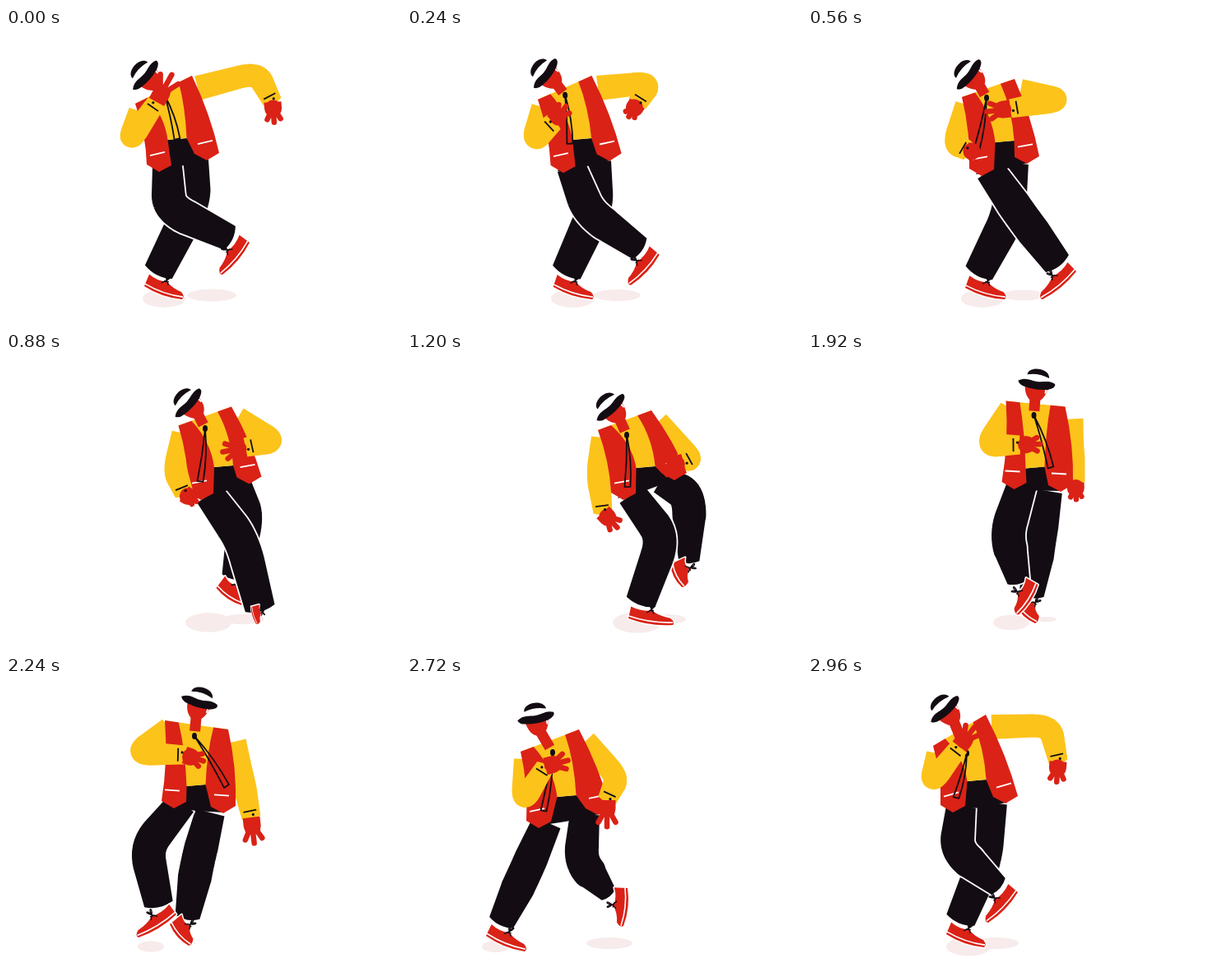
Write an HTML page with a canvas that moves like this. It is 480x360 px and loops after 3040 ms.

```html
<!DOCTYPE html>
<html lang="en">
<head>
<meta charset="utf-8">
<title>Dancing man</title>
<style>
html, body { margin: 0; width: 100%; height: 100%; overflow: hidden; background: #fff; }
canvas { display: block; }
</style>
</head>
<body>
<canvas id="stage" width="480" height="360"></canvas>
<script>
const ctx = document.getElementById('stage').getContext('2d');
const RED = '#da2217', YELLOW = '#fcc31b', BLACK = '#130d13', WHITE = '#fff', SHADE = '#f7ebeb';
const LOOP = 3040, STEP = 80, TAU = 2 * Math.PI;

// Joints of each key pose. hat: x, y, tilt in degrees; shade: centre and radius of two blobs;
// sway: how far the head drifts halfway to the next pose; front: the leg drawn on top.
const poses = [
  { t: 0, front: 'L', sway: [-14, -2], hat: [170, 58, -49], knot: [193, 82], tie: [208, 135],
    waist: [208, 135], shade: [192, 26, 250, 30],
    L: { shoulder: [157, 92], elbow: [150, 138], wrist: [183, 90], tip: [203, 54],
         hem: [186, 175], knee: [198, 220], heel: [296, 261], toe: [263, 300] },
    R: { shoulder: [226, 58], elbow: [305, 54], wrist: [324, 90], tip: [326, 117],
         hem: [244, 161], knee: [228, 212], heel: [168, 314], toe: [214, 330] } },
  { t: 560, front: 'L', sway: [0, 0], hat: [196, 57, -51], knot: [217, 85], tie: [204, 151],
    waist: [239, 138], shade: [212, 26, 262, 26],
    L: { shoulder: [187, 84], elbow: [178, 140], wrist: [195, 150], tip: [208, 150],
         hem: [211, 180], knee: [262, 232], heel: [326, 296], toe: [285, 330] },
    R: { shoulder: [251, 62], elbow: [309, 87], wrist: [246, 98], tip: [215, 102],
         hem: [266, 165], knee: [243, 230], heel: [191, 316], toe: [239, 330] } },
  { t: 1200, front: 'L', sway: [20, -20], hat: [248, 68, -43], knot: [267, 101], tie: [268, 164],
    waist: [290, 140], shade: [280, 30, 315, 24],
    L: { shoulder: [232, 95], elbow: [232, 148], wrist: [238, 195], tip: [257, 215],
         hem: [263, 180], knee: [312, 226], heel: [269, 324], toe: [323, 332] },
    R: { shoulder: [297, 71], elbow: [345, 129], wrist: [336, 134], tip: [307, 142],
         hem: [325, 156], knee: [343, 175], heel: [320, 258], toe: [334, 286] } },
  { t: 1600, front: 'R', sway: [0, 0], hat: [321, 46, 0], knot: [320, 81], tie: [322, 147],
    waist: [321, 148], shade: [318, 28, 350, 22],
    L: { shoulder: [288, 65], elbow: [276, 133], wrist: [298, 130], tip: [327, 120],
         hem: [297, 173], knee: [312, 235], heel: [352, 276], toe: [351, 321] },
    R: { shoulder: [355, 68], elbow: [355, 112], wrist: [352, 146], tip: [350, 156],
         hem: [350, 173], knee: [329, 232], heel: [304, 312], toe: [330, 332] } },
  { t: 2240, front: 'L', sway: [0, 0], hat: [235, 32, 16], knot: [229, 73], tie: [268, 134],
    waist: [231, 133], shade: [176, 16, 229, 3],
    L: { shoulder: [193, 54], elbow: [158, 94], wrist: [217, 96], tip: [242, 104],
         hem: [204, 161], knee: [170, 208], heel: [207, 290], toe: [161, 318] },
    R: { shoulder: [270, 65], elbow: [288, 125], wrist: [298, 172], tip: [302, 206],
         hem: [264, 167], knee: [233, 225], heel: [199, 302], toe: [222, 328] } },
  { t: 2720, front: 'L', sway: [0, 0], hat: [157, 51, -11], knot: [177, 93], tie: [166, 164],
    waist: [194, 146], shade: [108, 17, 246, 28],
    L: { shoulder: [138, 92], elbow: [141, 153], wrist: [168, 110], tip: [198, 102],
         hem: [160, 185], knee: [143, 240], heel: [96, 316], toe: [143, 335] },
    R: { shoulder: [209, 65], elbow: [256, 123], wrist: [243, 151], tip: [243, 186],
         hem: [232, 169], knee: [211, 226], heel: [268, 258], toe: [263, 304] } },
  { t: 2960, front: 'L', sway: [0, 0], hat: [167, 41, -42], knot: [193, 94], tie: [180, 148],
    waist: [205, 127], shade: [195, 27, 228, 28],
    L: { shoulder: [152, 85], elbow: [150, 130], wrist: [184, 86], tip: [204, 60],
         hem: [176, 166], knee: [180, 212], heel: [255, 263], toe: [219, 300] },
    R: { shoulder: [216, 47], elbow: [294, 60], wrist: [304, 104], tip: [302, 131],
         hem: [240, 155], knee: [214, 228], heel: [168, 314], toe: [214, 330] } },
];

const add = (p, q, k = 1) => [p[0] + q[0] * k, p[1] + q[1] * k];
const sub = (p, q) => add(p, q, -1);
const dot = (p, q) => p[0] * q[0] + p[1] * q[1];
const unit = p => { const d = Math.hypot(...p) || 1; return [p[0] / d, p[1] / d]; };
const perp = p => [-p[1], p[0]];

// Blends numbers, and arrays or objects of them
function mix(a, b, u) {
  if (typeof a === 'number') return a + (b - a) * u;
  if (Array.isArray(a)) return a.map((v, i) => mix(v, b[i], u));
  if (typeof a === 'string') return u < 0.5 ? a : b;
  return Object.fromEntries(Object.keys(a).map(k => [k, mix(a[k], b[k], u)]));
}

function fill(path, color) {
  ctx.fillStyle = color;
  ctx.fill(path);
}

function stroke(path, color, width) {
  ctx.strokeStyle = color;
  ctx.lineWidth = width;
  ctx.stroke(path);
}

function polygon(...pts) {
  const path = new Path2D();
  pts.forEach(p => path.lineTo(...p));
  path.closePath();
  return path;
}

function segment(a, b) {
  const path = new Path2D();
  path.moveTo(...a);
  path.lineTo(...b);
  return path;
}

function ellipse(x, y, rx, ry, from = 0, to = TAU) {
  const path = new Path2D();
  path.ellipse(x, y, rx, ry, 0, from, to);
  return path;
}

// Line a-b-c with a rounded bend at b
function bend(a, b, c) {
  const m = mix(b, a, 0.3), n = mix(b, c, 0.3), pts = [a];
  for (let u = 0; u <= 1; u += 0.125) pts.push(mix(mix(m, b, u), mix(b, n, u), u));
  return [...pts, c];
}

// Tapered limb: union of discs and slices around a centre line
function tube(pts, start, middle, end) {
  const path = new Path2D(), last = pts.length - 1;
  const radius = i => i === 0 ? start : i === last ? end : middle;
  for (let i = 0; i < last; i++) {
    const p = pts[i], q = pts[i + 1], dir = unit(sub(q, p)), n = perp(dir);
    const r = radius(i), s = radius(i + 1);
    path.moveTo(...add(p, n, r));
    path.lineTo(...add(q, n, s));
    path.quadraticCurveTo(...add(q, dir, s * 0.45), ...add(q, n, -s));
    path.lineTo(...add(p, n, -r));
    path.closePath();
    if (i) {
      path.moveTo(p[0] + r, p[1]);
      path.arc(...p, r, 0, TAU, true);
    }
  }
  return path;
}

// Local frame of a shoe; the sole faces away from the knee
function shoeFrame({ heel, toe, knee }) {
  const v = sub(toe, heel), d = unit(v), n = perp(d);
  const side = Math.max(-1, Math.min(1, dot(sub(knee, heel), n) / 30));
  const length = Math.max(20, Math.hypot(...v));
  return { d, up: [n[0] * side, n[1] * side], length, height: 15 * Math.sqrt(54 / length) };
}

const bow = new Path2D('M-5 5L0 0C-6 -8 0 -10 0 0C2 -9 7 -7 0 0L4 5M-3 2L3 1');

function drawShoe(foot, { d, up, length: l, height: h }) {
  const shoe = new Path2D(`M0 0L${l * 0.02} ${-h}Q${l * 0.25} ${-h * 0.7} ${l * 0.5} ${-h * 0.9}
    Q${l * 0.68} ${-h * 0.55} ${l * 0.92} ${-h * 0.52}Q${l * 1.06} ${-h * 0.25} ${l} 0Q${l / 2} 6 0 0Z`);
  ctx.save();
  ctx.transform(...d, -up[0], -up[1], ...foot.heel);
  stroke(shoe, WHITE, 3);
  fill(shoe, RED);
  stroke(new Path2D(`M0 -3Q${l / 2} 2 ${l} -3`), WHITE, 1.6);
  ctx.translate(l * 0.48, -h);
  stroke(bow, BLACK, 1.4);
  ctx.restore();
}

function drawLeg(side, hip) {
  const frame = shoeFrame(side);
  const ankle = add(add(side.heel, frame.d, frame.length * 0.22), frame.up, 22);
  const reach = Math.hypot(...sub(side.knee, hip)) + Math.hypot(...sub(ankle, side.knee));
  const hem = 16 * Math.min(1.15, (reach / 134) ** 2);
  const leg = tube(bend(hip, side.knee, ankle), 18, 20.5, hem);
  stroke(leg, WHITE, 3.6);
  fill(leg, BLACK);
  drawShoe(side, frame);
}

// One half of the vest; s is 1 for the left panel and -1 for the right one
function drawPanel({ shoulder, hem }, collar, waist, s, across) {
  const inner = add(hem, [s * 15, -8]), outer = add(hem, [s * -15, -9]);
  const side = add(mix(outer, shoulder, 0.5), [6, 0]);
  const path = new Path2D();
  path.moveTo(...collar);
  path.quadraticCurveTo(mix(collar[0], waist[0], 0.85), mix(collar[1], waist[1], 0.45), ...waist);
  path.lineTo(...inner);
  path.lineTo(...hem);
  path.lineTo(...outer);
  path.quadraticCurveTo(...side, ...shoulder);
  fill(path, RED);
  const pocket = add(hem, [-2, -22]), slope = [9, across[1] * 5];
  stroke(segment(sub(pocket, slope), add(pocket, slope)), WHITE, 1.8);
}

function drawHead({ hat: [x, y, tilt], knot }) {
  const a = tilt * Math.PI / 180;
  const face = [x - 12 * Math.sin(a), y + 12 * Math.cos(a)];
  stroke(segment(face, mix(face, knot, 0.8)), RED, 13);
  ctx.save();
  ctx.translate(x, y);
  ctx.rotate(a);
  fill(ellipse(0, 1, 14, 21, 0, Math.PI), RED);
  stroke(segment([12, 4], [12, 10]), WHITE, 2);
  fill(new Path2D('M-13 -11H13L15 0H-15Z'), WHITE);
  fill(new Path2D('M-23 -1C-14 -7 -8 -3 0 -3S14 -7 22 -3Q24 2 14 5Q0 8 -14 5Q-21 4 -23 -1Z'), BLACK);
  fill(new Path2D('M-13 -10C-13 -21 13 -22 14 -9Q0 -14 -13 -10Z'), BLACK);
  ctx.restore();
}

function drawTie({ knot, tie }) {
  const n = perp(unit(sub(tie, knot))), mid = add(mix(knot, tie, 0.5), n, -3);
  const path = new Path2D();
  path.moveTo(...knot);
  path.quadraticCurveTo(...add(mid, n, 3), ...add(tie, n, 3.5));
  path.lineTo(...add(tie, n, -3.5));
  path.quadraticCurveTo(...add(mid, n, -3), ...knot);
  stroke(path, BLACK, 1.8);
  fill(ellipse(...knot, 3, 4), BLACK);
}

function drawHand({ wrist, tip }) {
  const v = sub(tip, wrist), palm = mix(wrist, tip, 0.5);
  fill(tube([wrist, mix(wrist, tip, 0.3), palm], 10.5, 10.5, 9), RED);
  ctx.lineCap = 'round';
  for (const spread of [-0.3, 0, 0.3]) {
    const end = add(add(wrist, v, 0.92 - Math.abs(spread) / 2), perp(v), spread);
    stroke(segment(add(palm, perp(v), spread / 2), end), RED, 6.5);
  }
  ctx.lineCap = 'butt';
}

function drawCuff({ elbow, wrist }) {
  const d = unit(sub(wrist, elbow)), n = perp(d), at = add(wrist, d, -8);
  stroke(segment(add(at, n, 8), add(at, n, -8)), BLACK, 1.8);
  fill(ellipse(...add(add(wrist, d, -3), n, -3), 1.6, 1.6), BLACK);
}

function drawForearm(side, arm) {
  const { shoulder, elbow, wrist } = side;
  const bent = dot(unit(sub(elbow, shoulder)), unit(sub(wrist, elbow))) < 0.9;
  if (bent) fill(tube(arm.slice(5), 14, 14, 11.5), YELLOW);
  drawHand(side);
  if (bent || wrist[1] > side.hem[1]) drawCuff(side);
}

function drawMan(pose) {
  const { L, R, waist, shade } = pose;
  const across = unit(sub(R.shoulder, L.shoulder));
  const collarL = add(L.shoulder, across, 17), collarR = add(R.shoulder, across, -18);
  const waistL = add(waist, [-11.5, 1]), waistR = add(waist, [11.5, -1]);
  const hipL = add(L.hem, [10, -7]), hipR = add(R.hem, [-16, -1]);
  const armL = bend(add(L.shoulder, [5, 9]), L.elbow, L.wrist);
  const armR = bend(add(R.shoulder, [7, 15]), R.elbow, R.wrist);

  fill(ellipse(shade[0], 329, shade[1], shade[1] * 0.42), SHADE);
  fill(ellipse(shade[2], 325, shade[3], shade[3] * 0.25), SHADE);

  const legs = [() => drawLeg(R, hipR), () => drawLeg(L, hipL)];
  if (pose.front === 'R') legs.reverse();
  legs.forEach(draw => draw());
  fill(polygon(waistL, waistR, add(hipR, [17, 0]), add(mix(hipL, hipR, 0.5), [0, 4]), add(hipL, [-17, 5])), BLACK);

  fill(tube(armL, 13, 14, 11.5), YELLOW);
  fill(tube(armR, 15, 14, 11.5), YELLOW);
  fill(polygon(L.shoulder, collarL, collarR, R.shoulder, waistR, waistL), YELLOW);
  drawPanel(L, collarL, waistL, 1, across);
  drawPanel(R, collarR, waistR, -1, across);
  drawHead(pose);
  drawTie(pose);
  drawForearm(L, armL);
  drawForearm(R, armR);
}

function render(now) {
  const t = Math.floor(now % LOOP / STEP) * STEP;
  const i = poses.findLastIndex(p => p.t <= t);
  const a = poses[i], b = poses[i + 1] || { ...poses[0], t: LOOP };
  const u = (t - a.t) / (b.t - a.t);
  const [sx, sy] = a.sway.map(s => s * Math.sin(Math.PI * u) / 290);
  ctx.setTransform(1, 0, 0, 1, 0, 0);
  ctx.fillStyle = WHITE;
  ctx.fillRect(0, 0, 480, 360);
  ctx.lineJoin = 'round';
  // Shear that keeps the ground in place
  ctx.setTransform(1, 0, -sx, 1 - sy, sx * 320, sy * 320);
  drawMan(mix(a, b, u));
}

let start;
function tick(now) {
  start ??= now;
  render(now - start);
  requestAnimationFrame(tick);
}
render(0);
requestAnimationFrame(tick);
</script>
</body>
</html>
```
